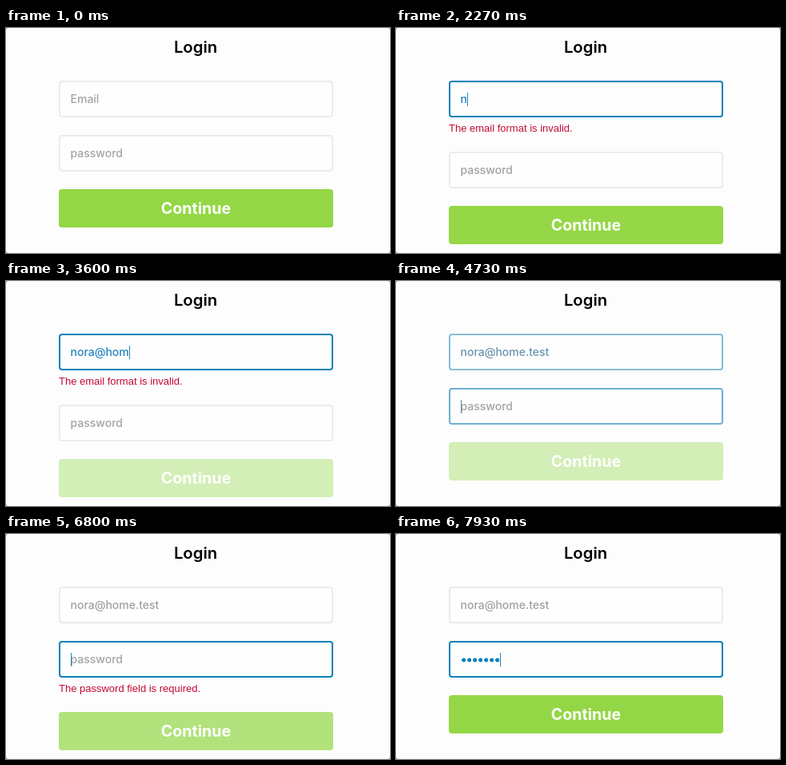
An HTML page that plays this animation: 480x282 px, repeating every 8000 ms.

```html
<!DOCTYPE html>
<html lang="en">
<head>
<meta charset="utf-8">
<title>Login form</title>
<style>
  html, body { margin: 0; width: 100%; height: 100%; overflow: hidden; background: #8b8b8d; }
  #stage {
    position: relative; width: 480px; height: 282px; overflow: hidden;
    border-radius: 3px; background: #fdfdfe;
    font-family: Inter, "Open Sans", sans-serif;
  }
  #stage > * { position: absolute; left: 66px; box-sizing: border-box; white-space: pre; }
  #stage > h1 {
    left: 0; top: 12px; width: 474px; margin: 0;
    font-size: 20.3px; line-height: 24px; font-weight: 600; text-align: center; color: #000;
  }
  .field {
    --focus: 0%;
    width: 343px; height: 46px; border-radius: 4px;
    border: 2px solid color-mix(in srgb, #0c82b8 var(--focus), #e9ebf0);
    color: color-mix(in srgb, #2484bc var(--focus), #a0a0a3);
    background: #fefefe;
    font-size: 14px; line-height: 42px; font-weight: 450;
  }
  .field > * { position: absolute; top: 0; left: 12.5px; }
  .hint { color: #a3a3a7; }
  .value { height: 42px; }
  .caret { position: absolute; left: 100%; top: 13px; width: 1px; height: 17px; background: currentColor; }
  .dots {
    display: inline-block; height: 42px; vertical-align: top;
    background: radial-gradient(circle at 3.7px 22px, #0d80bd 2.2px, transparent 2.9px) 0 0 / 7px 42px repeat-x;
  }
  .error {
    font: 300 13px/16px "Liberation Sans", Arial, sans-serif;
    color: #c20a35;
  }
  #button {
    --pale: 0%;
    width: 343px; height: 48px; border-radius: 4px;
    background: color-mix(in srgb, #d3eeb7 var(--pale), #94d746);
    color: #fff; font-size: 19.6px; line-height: 48px; font-weight: 700; text-align: center;
  }
</style>
</head>
<body>
<div id="stage">
  <h1>Login</h1>
  <div class="field" id="email" style="top:66px">
    <span class="hint">Email</span>
    <span class="value"><span class="text"></span><i class="caret"></i></span>
  </div>
  <div class="error" id="emailError" style="top:118px">The email format is invalid.</div>
  <div class="field" id="password">
    <span class="hint">password</span>
    <span class="value"><span class="dots"></span><i class="caret"></i></span>
  </div>
  <div class="error" id="passwordError" style="top:186px">The password field is required.</div>
  <div id="button">Continue</div>
</div>
<script>
const LOOP = 8000, FADE = 500, BLINK = 500;
const ADDRESS = "nora@home.test";

const emailFocus = 1260, passwordFocus = 4570;
const emailKeys = [2260, 2460, 2590, 2790, 3060, 3190, 3390, 3590, 3720, 3860, 3990, 4120, 4260, 4390];
const emailValid = emailKeys[12];

const steps = (start, gap, count) => Array.from({ length: count }, (_, i) => start + i * gap);
const firstTry = steps(5120, 123, 7);
const erasing = steps(6260, 66.7, 7);
const secondTry = steps(7120, 133, 7);
const cleared = erasing[6];

const byId = id => document.getElementById(id);
const email = byId("email"), password = byId("password"), button = byId("button");

const countPassed = (times, t) => times.filter(time => time <= t).length;

// CSS "ease": cubic-bezier(.25, .1, .25, 1)
function ease(x) {
  if (x <= 0) return 0;
  if (x >= 1) return 1;
  const curve = (s, a, b) => 3 * a * s * (1 - s) ** 2 + 3 * b * s * s * (1 - s) + s ** 3;
  let low = 0, high = 1;
  for (let i = 0; i < 20; i++) {
    const mid = (low + high) / 2;
    if (curve(mid, .25, .25) < x) low = mid; else high = mid;
  }
  return curve(low, .1, 1);
}

// Each change starts an eased move to the opposite state, beginning from 0.
function toggled(t, changes) {
  const count = countPassed(changes, t);
  if (!count) return "0%";
  const progress = ease((t - changes[count - 1]) / FADE);
  return 100 * (count % 2 ? progress : 1 - progress) + "%";
}

function showField(field, t, focusChanges, empty, keys) {
  field.style.setProperty("--focus", toggled(t, focusChanges));
  field.querySelector(".hint").hidden = !empty;
  const focused = countPassed(focusChanges, t) === 1;
  const lastKey = Math.max(...[focusChanges[0], ...keys].filter(time => time <= t));
  const lit = focused && Math.floor((t - lastKey) / BLINK) % 2 === 0;
  field.querySelector(".caret").style.visibility = lit ? "visible" : "hidden";
}

function render(t) {
  const typed = countPassed(emailKeys, t);
  const dots = countPassed(firstTry, t) - countPassed(erasing, t) + countPassed(secondTry, t);
  const emailBad = t >= emailKeys[0] && t < emailValid;
  const passwordBad = t >= cleared && t < secondTry[0];

  email.querySelector(".text").textContent = ADDRESS.slice(0, typed);
  password.querySelector(".dots").style.width = dots * 7 + "px";
  showField(email, t, [emailFocus, passwordFocus], !typed, emailKeys);
  showField(password, t, [passwordFocus], !dots, [...firstTry, ...erasing, ...secondTry]);

  byId("emailError").hidden = !emailBad;
  byId("passwordError").hidden = !passwordBad;
  password.style.top = (emailBad ? 155 : 134) + "px";
  button.style.top = (emailBad || passwordBad ? 223 : 202) + "px";
  button.style.setProperty("--pale", toggled(t, [emailKeys[0], firstTry[0], cleared, secondTry[0]]));
}

function frame() {
  render(performance.now() % LOOP);
  requestAnimationFrame(frame);
}
frame();
</script>
</body>
</html>
```
